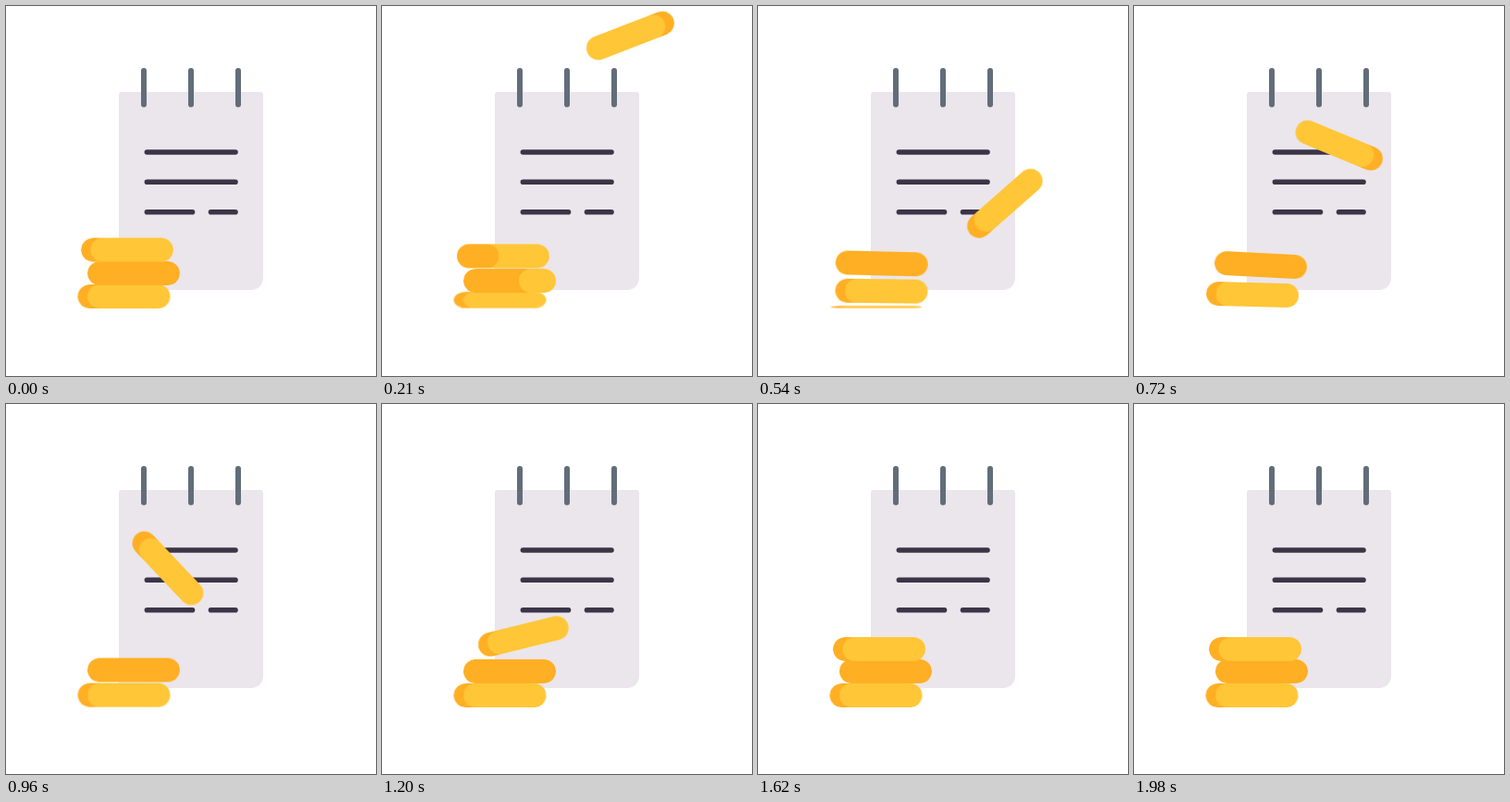
Animation of 400x400 px, one loop 4.01 s. Source, as an HTML page without scripts:

```html
<!DOCTYPE html>
<html lang="en">
<head>
<meta charset="utf-8">
<title>Notepad and coins</title>
<style>
  html, body { margin: 0; width: 100%; height: 100%; overflow: hidden; background: #fff; }
  svg { display: block; width: 100%; height: 100%; }

  .light { fill: #ffc637; }
  .dark { fill: #ffaf23; }
  .lines { stroke: #3c3447; stroke-width: 5.6; stroke-linecap: round; }
  .pins { stroke: #616d79; stroke-width: 6; stroke-linecap: round; }
  .coin { clip-path: url(#pill-clip); }

  .move { animation: 4010ms linear infinite both; }

  /* bottom coin flattens away */
  .squash { transform-origin: 0 13px; animation-name: squash; }
  @keyframes squash {
    0%, .75% { transform: scaleY(1); }
    9.73% { transform: scaleY(.42); }
    15%, 100% { transform: scaleY(0); }
  }

  /* middle coin drops to the bottom */
  .to-bottom { animation-name: to-bottom; }
  @keyframes to-bottom {
    0%, .75% { transform: translate(138px, 289px) rotate(0deg); }
    9.73% { transform: translate(138px, 305px) rotate(0deg); }
    17.96% { transform: translate(128px, 312px) rotate(1.5deg); }
    23.94% { transform: translate(127.4px, 314.6px) rotate(0deg); }
    27%, 100% { transform: translate(127.4px, 315px) rotate(0deg); }
  }
  .face-in { animation-name: face-in; }
  @keyframes face-in {
    0%, .75% { transform: translateX(101px); }
    9.73% { transform: translateX(19px); }
    10.8%, 100% { transform: translateX(10.5px); }
  }

  /* top coin drops to the middle */
  .to-middle { animation-name: to-middle; }
  @keyframes to-middle {
    0%, .75% { transform: translate(131px, 263.6px) rotate(0deg); }
    9.73% { transform: translate(131px, 277px) rotate(0deg); }
    17.96% { transform: translate(137px, 280px) rotate(3deg); }
    23.94% { transform: translate(138px, 287.5px) rotate(0deg); }
    27%, 100% { transform: translate(138px, 289px) rotate(0deg); }
  }
  .cover { animation-name: cover; }
  @keyframes cover {
    0%, .75% { transform: translateX(-101px); }
    9.73% { transform: translateX(-9px); }
    10.8%, 100% { transform: translateX(0); }
  }

  /* new coin falls in, bounces and lands on top */
  .fly-x { animation-name: fly-x; }
  @keyframes fly-x {
    0% { transform: translateX(262px); }
    9.73% { transform: translateX(274px); }
    13.47% { transform: translateX(267px); }
    17.96% { transform: translateX(222px); }
    23.94% { transform: translateX(175px); }
    29.93% { transform: translateX(153px); animation-timing-function: ease-out; }
    33.5%, 100% { transform: translateX(131px); }
  }
  .fly-y { animation-name: fly-y; }
  @keyframes fly-y {
    0% { transform: translateY(-64px); animation-timing-function: cubic-bezier(.33, 0, .67, .33); }
    9.73% { transform: translateY(266px); }
    10.47% { transform: translateY(292px); animation-timing-function: cubic-bezier(.33, .67, .67, 1); }
    20.2% { transform: translateY(143px); animation-timing-function: cubic-bezier(.33, 0, .67, .33); }
    23.94% { transform: translateY(177px); animation-timing-function: cubic-bezier(.33, .45, .67, .9); }
    29.93% { transform: translateY(251px); }
    33%, 100% { transform: translateY(265px); }
  }
  .spin { animation-name: spin; }
  @keyframes spin {
    0% { transform: rotate(640deg); }
    9.73% { transform: rotate(416deg); }
    17.96% { transform: rotate(203deg); }
    23.94% { transform: rotate(47deg); animation-timing-function: ease-out; }
    29.93% { transform: rotate(-14deg); }
    33%, 100% { transform: rotate(0deg); }
  }
</style>
</head>
<body>
<svg viewBox="0 0 400 400">
  <defs>
    <rect id="pill" x="-50" y="-13" width="100" height="26" rx="13"/>
    <clipPath id="pill-clip"><use href="#pill"/></clipPath>
    <g id="coin" class="coin">
      <use href="#pill" class="dark"/>
      <use href="#pill" class="light" x="10.5"/>
    </g>
  </defs>

  <path fill="#ebe5ec" d="M125 93H275a3 3 0 0 1 3 3V294a13 13 0 0 1 -13 13H122V96a3 3 0 0 1 3 -3Z"/>
  <path class="pins" d="M149 70V106.500M200 70V106.500M251 70V106.500"/>
  <path class="lines" d="M152.400 158H248M152.400 190.300H248M152.400 222.800H201.500M221.500 222.800H248"/>

  <g transform="translate(127.400 314)">
    <g class="move squash"><use href="#coin"/></g>
  </g>

  <g class="move to-bottom">
    <g class="coin">
      <use href="#pill" class="dark"/>
      <g class="move face-in"><use href="#pill" class="light"/></g>
    </g>
  </g>

  <g class="move to-middle">
    <g class="coin">
      <use href="#coin"/>
      <g class="move cover"><use href="#pill" class="dark"/></g>
    </g>
  </g>

  <g class="move fly-x"><g class="move fly-y"><g class="move spin">
    <use href="#coin"/>
  </g></g></g>
</svg>
</body>
</html>
```
